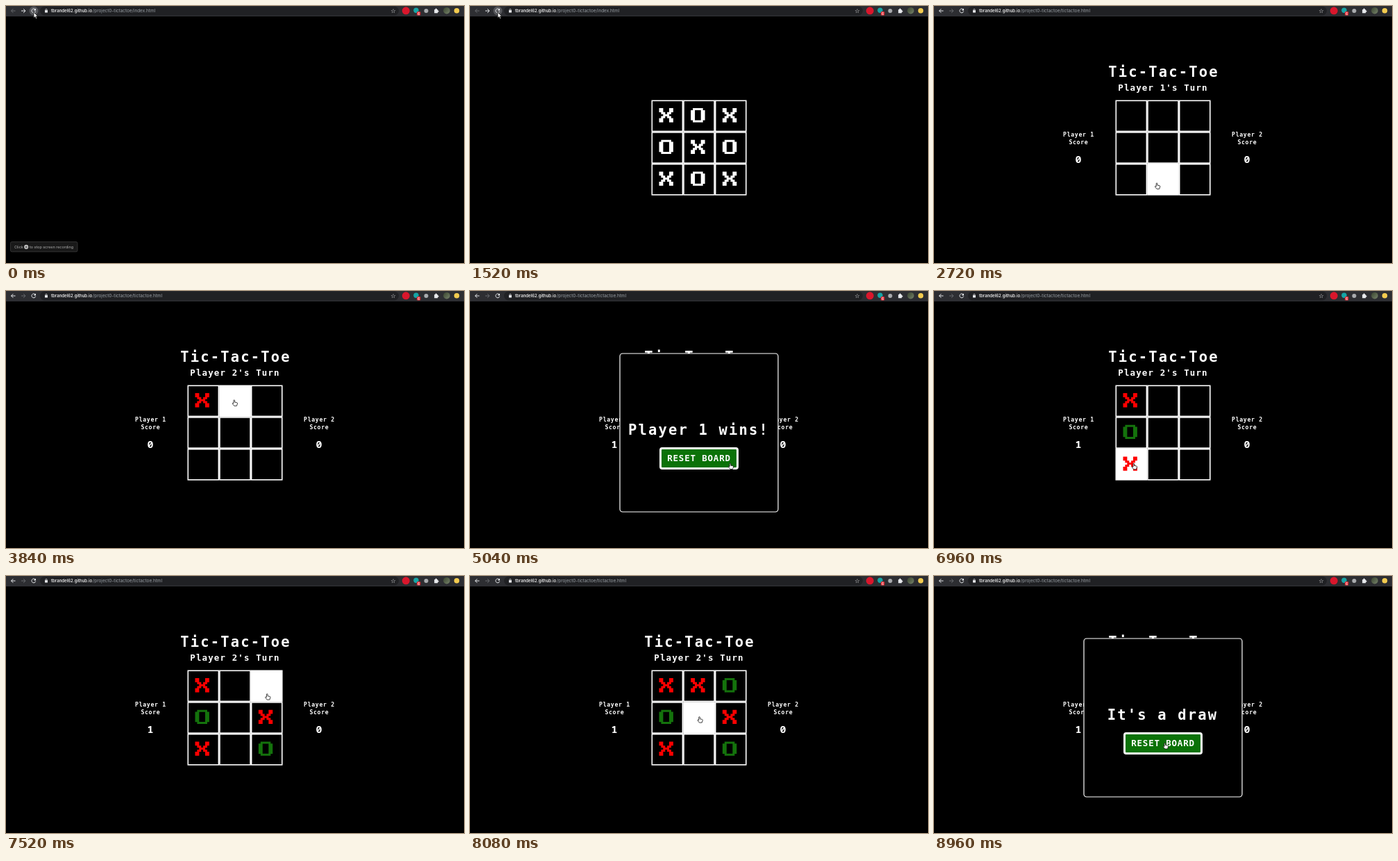
These frames come from a looping animation (660x370 px, 9040 ms). An HTML page:

```html
<!DOCTYPE html>
<html lang="en">
<head>
<meta charset="utf-8">
<title>Tic-Tac-Toe</title>
<style>
  html, body { margin: 0; width: 100%; height: 100%; overflow: hidden; background: #000; }
  svg { display: block; width: 100vw; height: 100vh; }
  text { fill: #fff; font-family: "DejaVu Sans Mono", monospace; font-weight: bold; text-anchor: middle; }
  .ui { font: 500 6.1px Inter, sans-serif; text-anchor: start; }
  .path { font-size: 6.4px; font-weight: 400; fill: #9aa0a6; }
  .note { font-size: 5.4px; fill: #9b9b9b; }
  .star { font: 8.5px "DejaVu Sans", sans-serif; }
  .big { font-size: 20.5px; letter-spacing: 2.15px; }
  .mid { font-size: 12.5px; letter-spacing: 1.1px; }
  .btn { font-size: 12.5px; letter-spacing: .8px; }
  .small { font-size: 8.2px; letter-spacing: .65px; }
  .score { font: bold 15px "Noto Sans Mono", monospace; }
  .line { fill: none; stroke: #e8eaed; }
  .cell { stroke: #fff; stroke-width: 1.6; }
</style>
</head>
<body>
<svg viewBox="0 0 660 370">
  <defs>
    <linearGradient id="photo" x2="1" y2="1">
      <stop stop-color="#39452f"/><stop offset="1" stop-color="#77836a"/>
    </linearGradient>
    <path id="arrowIcon" d="M-3 0H3M.2-2.8L3 0L.2 2.8"/>
  </defs>
  <rect width="660" height="370"/>

  <g id="toolbar">
    <rect width="660" height="15" fill="#2d2e32"/>
    <rect x="49" y=".5" width="517" height="13" rx="6.5" fill="#202124"/>
    <use id="back" class="line" href="#arrowIcon" transform="translate(10.5 7) scale(-1 1)"/>
    <use id="forward" class="line" href="#arrowIcon" transform="translate(25 7)"/>
    <circle id="reloadHover" cx="40" cy="7" r="6.5" fill="#55565a"/>
    <path class="line" d="M42 4.900A2.900 2.900 0 1 0 42.700 7.600"/>
    <path d="M43 3.400v3.200h-3.200z" fill="#e8eaed"/>
    <rect x="56" y="6" width="4" height="3.600" rx=".5" fill="#e8eaed"/>
    <circle class="line" cx="58" cy="5.500" r="1.200" stroke-width=".7"/>
    <text class="ui" x="65" y="9.100">tbrandel62.github.io</text>
    <text class="ui path" id="path" x="125" y="9.100"></text>
    <text class="star" x="558" y="10">☆</text>
    <circle cx="576.300" cy="6.800" r="5.500" fill="#d9172c"/>
    <circle cx="591" cy="6.300" r="3.700" fill="#16a5a5"/>
    <rect x="592" y="8" width="5.300" height="5.500" rx="1.200" fill="#e02b35"/>
    <text class="ui" x="593.200" y="12.600" style="font-size:4.8px">6</text>
    <circle cx="605.500" cy="7" r="3" fill="#a9abae"/>
    <g fill="#e8eaed">
      <rect x="617.200" y="5" width="5" height="5.300" rx=".6"/>
      <circle cx="619.700" cy="4.800" r="1.200"/>
      <circle cx="622.400" cy="7.600" r="1.200"/>
    </g>
    <circle cx="635" cy="6.700" r="4.800" fill="url(#photo)"/>
    <circle cx="649.500" cy="6.700" r="3.800" fill="#f3cb4f"/>
  </g>

  <g id="notice">
    <rect x="6.500" y="339.500" width="96.500" height="14.300" rx="2" fill="#191919" stroke="#3b3b3b" stroke-width=".8"/>
    <text class="ui note" x="12" y="348.900">Click</text>
    <circle cx="29.200" cy="346.900" r="2.400" fill="#777" stroke="#ccc" stroke-width="1.300"/>
    <text class="ui note" x="34" y="348.900">to stop screen recording</text>
  </g>

  <g id="game">
    <text class="big" x="331" y="102">Tic-Tac-Toe</text>
    <text class="mid" id="turn" x="330" y="121.800"></text>
    <g transform="translate(208)">
      <text class="small" x=".4" y="188">Player 1</text>
      <text class="small" x=".4" y="199">Score</text>
      <text class="score" y="226" id="score"></text>
    </g>
    <g transform="translate(451)">
      <text class="small" x=".4" y="188">Player 2</text>
      <text class="small" x=".4" y="199">Score</text>
      <text class="score" y="226">0</text>
    </g>
  </g>

  <g id="board"></g>

  <g id="modal">
    <rect x="216" y="90" width="228" height="228" rx="4" stroke="#fff" stroke-width="1.200"/>
    <text class="big" id="result" x="329.500" y="206.500"></text>
    <rect x="274.500" y="226.500" width="111" height="29" rx="2.500" fill="#0b7208" stroke="#fff" stroke-width="3"/>
    <text class="btn" x="330" y="244.800">RESET BOARD</text>
  </g>

  <g id="cursor" fill="#fff" stroke="#111" stroke-width=".8" stroke-linejoin="round">
    <path id="arrow" d="M-2-4v8.200l1.900-1.800 1.300 2.900 1.400-.6-1.300-2.800h2.600z"/>
    <path id="hand" d="M-2-3.600q.9-1 1.700 0v2.700l3.200.6q.8.300.7 1.200l-1.100 3.500h-3.700l-2.400-3q-.3-1 .5-1.100l1.100.7z"/>
  </g>
</svg>

<script>
const LOOP = 9040, STEP = 80;
const LEFT = 261.5, TOP = 135.5, PITCH = 45.7;
const NOTICE_END = 480, GRID_IN = 640, MARK_IN = 720;
const LEAVE_RELOAD = 1600, OPEN_GAME = 2480, RESET = 5920, END = 8960;
const COLOR = { X: '#f00', O: '#14720c' };

const $ = id => document.getElementById(id);
const show = (id, on) => $(id).style.display = on ? '' : 'none';
const corner = cell => [LEFT + cell % 3 * PITCH, TOP + Math.floor(cell / 3) * PITCH];

// A game is the order of clicked cells at a steady pace; X and O alternate.
const playGame = (order, start, pace) =>
  [...order].map((cell, i) => ({ t: start + i * pace, cell: +cell, mark: 'XO'[i % 2] }));
const firstGame = playGame('01458', 3600, 340);
const secondGame = playGame('036852147', 6480, 230);
const WIN = firstGame.at(-1).t, DRAW = secondGame.at(-1).t;

const clickStop = ({ t, cell }) => {
  const [x, y] = corner(cell);
  return { t, x: x + 24.5, y: y + 25.5 };
};
const stops = [
  { t: 0, x: 42, y: 13 }, { t: LEAVE_RELOAD, x: 42, y: 13 }, { t: OPEN_GAME, x: 330, y: 280 },
  ...firstGame.map(clickStop), { t: RESET, x: 335, y: 243 },
  ...secondGame.map(clickStop), { t: END, x: 334, y: 244.5 }
];

// Pixel letters on a 7 by 7 grid, from the distances to the centre.
const inLetter = {
  X: (dx, dy) => dx >= Math.min(dy, 2) && dx <= Math.min(dy + 1, 3),
  O: (dx, dy) => (dx >= 2 || dy === 3) && dx + dy < 6
};

function letterPath(letter) {
  let d = '';
  for (let row = 0; row < 7; row++)
    for (let column = 0; column < 7; column++)
      if (inLetter[letter](Math.abs(column - 3), Math.abs(row - 3)))
        d += `M${column} ${row}h1.03v1.03h-1.03z`;
  return d;
}
const LETTER = { X: letterPath('X'), O: letterPath('O') };

function make(tag, attributes) {
  const node = document.createElementNS('http://www.w3.org/2000/svg', tag);
  for (const key in attributes) node.setAttribute(key, attributes[key]);
  return $('board').appendChild(node);
}

const cells = Array.from({ length: 9 }, (_, i) => {
  const [x, y] = corner(i);
  return {
    box: make('rect', { class: 'cell', x: x + .8, y: y + .8, width: PITCH - 1.6, height: PITCH - 1.6 }),
    mark: make('path', { transform: `translate(${x + 11} ${y + 11.5}) scale(2.9)` })
  };
});

// The pointer reaches each stop a little before its click, then rests.
function pointerAt(t) {
  const next = stops.findIndex(stop => stop.t > t);
  if (next < 0) return stops.at(-1);
  const a = stops[next - 1], b = stops[next];
  const u = Math.min(1, (t - a.t) / (b.t - a.t) / .8), ease = u * u * (3 - 2 * u);
  return { x: a.x + (b.x - a.x) * ease, y: a.y + (b.y - a.y) * ease };
}

function cellUnder(x, y) {
  const column = Math.floor((x - LEFT) / PITCH), row = Math.floor((y - TOP) / PITCH);
  return column >= 0 && column < 3 && row >= 0 && row < 3 ? row * 3 + column : -1;
}

function render(t) {
  const inGame = t >= OPEN_GAME;
  const modal = t >= WIN && t < RESET || t >= DRAW;
  const { x, y } = pointerAt(t);
  const hovered = inGame ? cellUnder(x - 1, y - 4) : -1;
  const moves = (t < RESET ? firstGame : secondGame).filter(move => move.t <= t);

  cells.forEach(({ box, mark }, i) => {
    const intro = t >= MARK_IN + i * STEP ? 'XO'[i % 2] : '';
    const letter = inGame ? moves.find(move => move.cell === i)?.mark : intro;
    box.setAttribute('fill', i === hovered ? '#fff' : '#000');
    mark.setAttribute('d', LETTER[letter] || '');
    mark.setAttribute('fill', inGame && letter ? COLOR[letter] : '#fff');
  });

  show('notice', t < NOTICE_END);
  show('board', t >= GRID_IN);
  show('game', inGame);
  show('modal', modal);
  $('turn').textContent = `Player ${moves.length % 2 + 1}'s Turn`;
  $('score').textContent = t >= WIN ? 1 : 0;
  $('result').textContent = t >= DRAW ? "It's a draw" : 'Player 1 wins!';

  $('path').textContent = `/project0-tictactoe/${inGame ? 'tictactoe' : 'index'}.html`;
  $('back').style.stroke = inGame ? '#e8eaed' : '#66686c';
  $('forward').style.stroke = inGame ? '#66686c' : '#e8eaed';
  show('reloadHover', x < 48 && y < 18);

  const clickable = hovered >= 0 || modal;
  show('arrow', !clickable);
  show('hand', clickable);
  $('cursor').setAttribute('transform', `translate(${x} ${y})`);
}

function tick() {
  render(Math.floor(performance.now() % LOOP / STEP) * STEP);
  requestAnimationFrame(tick);
}
tick();
</script>
</body>
</html>
```
